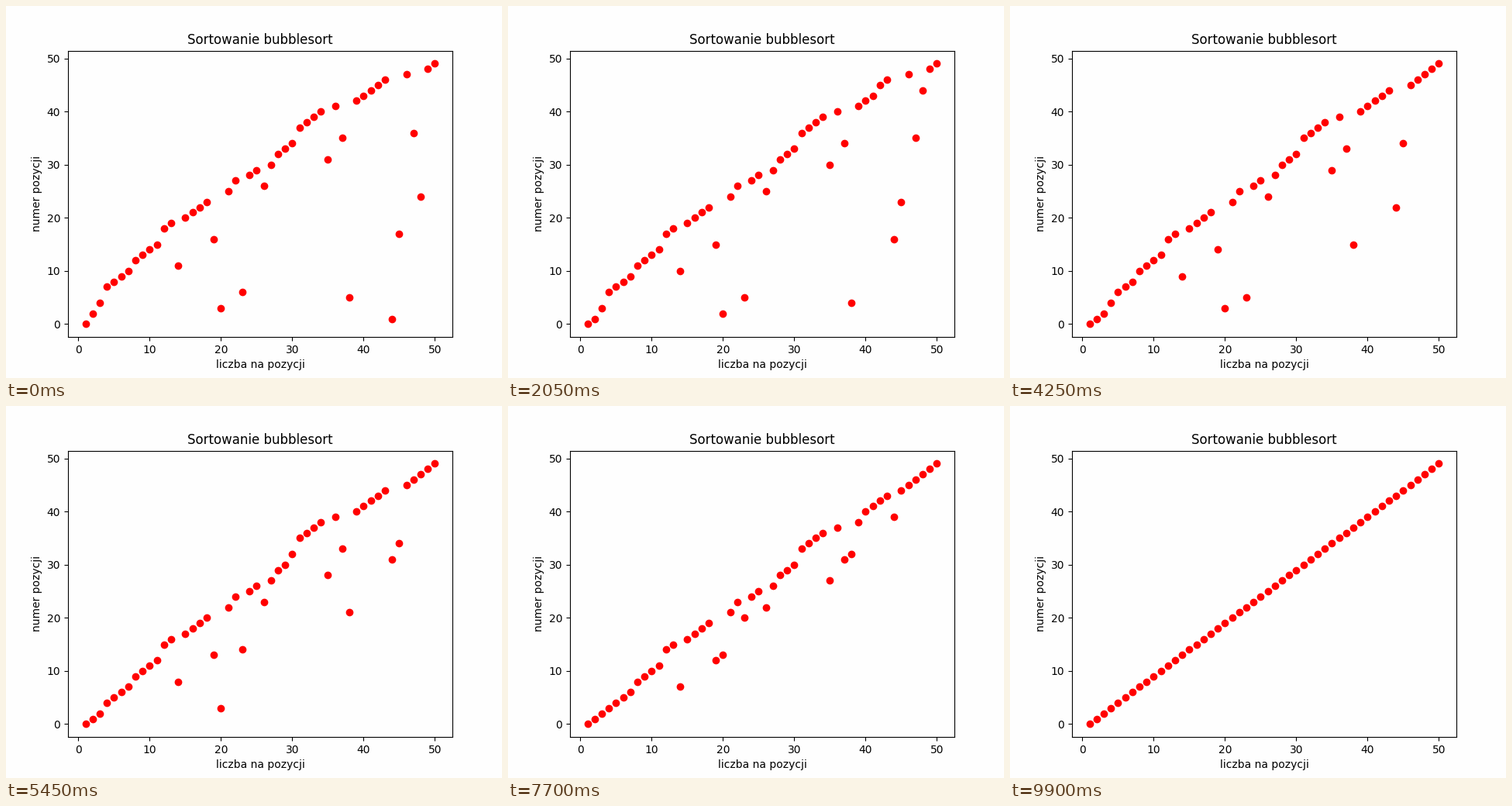
Recreate the animation shown at these times as a matplotlib script. Size 640 px wide and 480 px high, loop 9950 ms.

```python
import matplotlib.pyplot as plt
from matplotlib.animation import FuncAnimation

COUNT = 50
PAPER = "#fefefe"
# Key points: each misplaced value is followed by the value it stands before.
STRAYS = {44: 2, 20: 3, 38: 4, 23: 4, 14: 8, 19: 12,
          45: 12, 48: 21, 26: 22, 35: 28, 37: 31, 47: 31}


def start_order():
    order = [v for v in range(1, COUNT + 1) if v not in STRAYS]
    for value, follower in STRAYS.items():
        order.insert(order.index(follower), value)
    return order


def bubble_states(order):
    """Yield the order at the start and after every swap."""
    yield order[:]
    for end in range(len(order) - 1, 0, -1):
        for i in range(end):
            if order[i] > order[i + 1]:
                order[i], order[i + 1] = order[i + 1], order[i]
                yield order[:]


states = list(bubble_states(start_order()))
positions = range(COUNT)

fig, ax = plt.subplots(figsize=(6.4, 4.8), dpi=100, facecolor=PAPER)
ax.set_facecolor(PAPER)
dots, = ax.plot(states[0], positions, "ro")
ax.set_title("Sortowanie bubblesort")
ax.set_xlabel("liczba na pozycji")
ax.set_ylabel("numer pozycji")


def draw(frame):
    dots.set_data(states[frame], positions)
    return dots,


anim = FuncAnimation(fig, draw, frames=len(states), interval=50,
                     repeat=True, repeat_delay=0)
plt.show()
```
